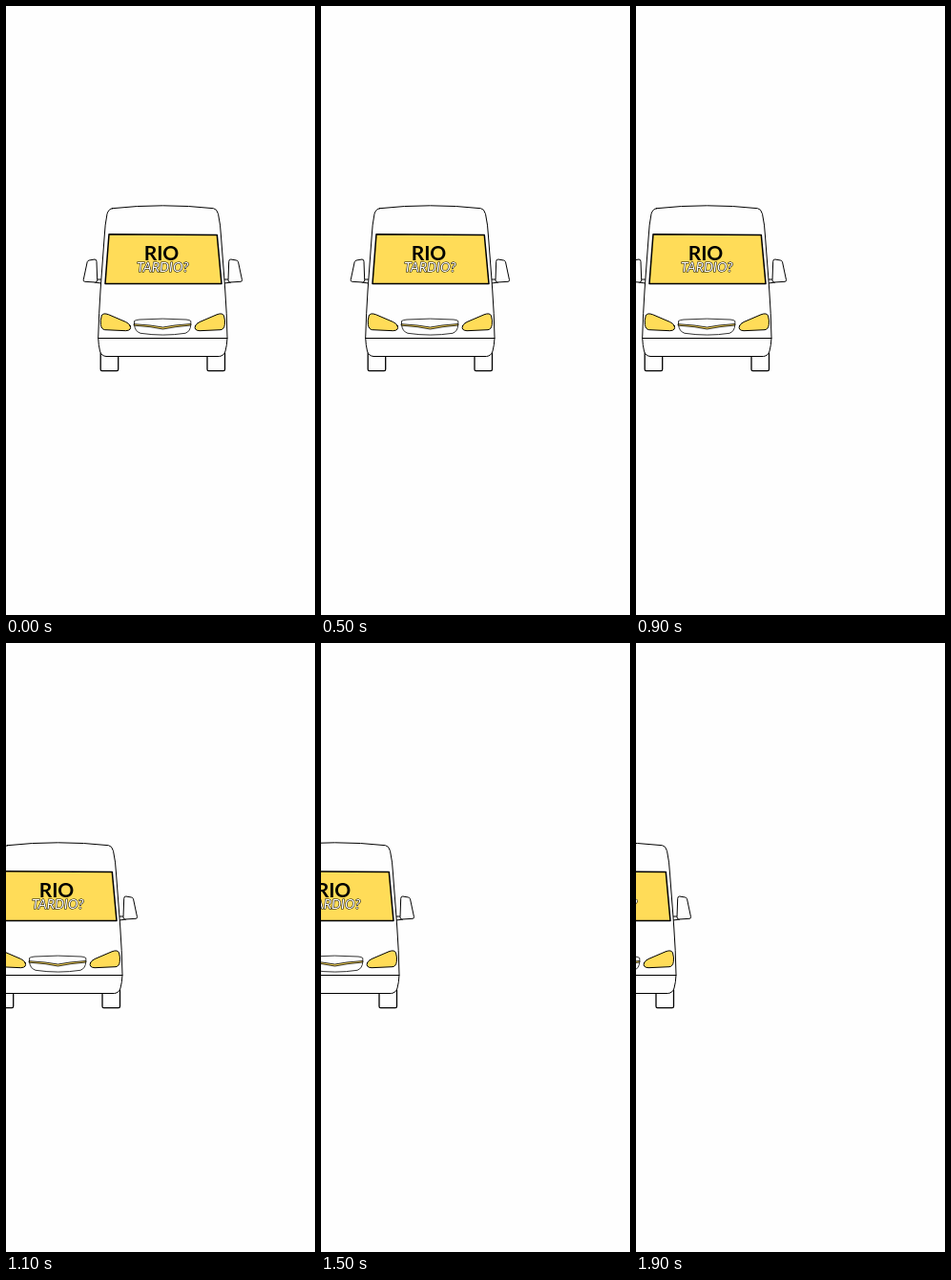
Recreate the animation shown at these times as an HTML page. Size 324x637 px, loop 2000 ms.

```html
<!DOCTYPE html>
<html lang="pt">
<head>
<meta charset="utf-8">
<title>Van</title>
<style>
  html, body { margin: 0; width: 100%; height: 100%; overflow: hidden; background: #fefefe; }
  svg { display: block; width: 100%; height: 100%; }
  .line { fill: #fefefe; stroke: #000; stroke-width: 1; stroke-linejoin: round; stroke-linecap: round; }
  .bold { stroke-width: 1.3; }
  .thin { stroke-width: .8; }
  .sun { fill: #ffdc58; }
  .glass { stroke-width: 1.5; }
  text { font-family: Lato, "Open Sans", sans-serif; text-anchor: middle; }
  .big { font-size: 21px; font-weight: 700; }
  .small { font-size: 14.2px; font-style: italic; fill: #fff; stroke: #000; stroke-width: 1; paint-order: stroke; }
</style>
</head>
<body>
<svg viewBox="0 0 324 637">
  <defs>
    <g id="side" class="line">
      <path class="bold" d="M211 366V380Q211 381.700 212.500 381.700H228Q229.500 381.700 229.500 380V363"/>
      <path d="M229 286H236V289L229 290"/>
      <path d="M233.700 267Q233.700 265 235.700 265L241.500 266Q243 266.300 243.500 267.700L247.500 286.500Q247.800 288.200 246 288.300L235 289Q233 289 233 287Z"/>
    </g>
    <path id="lamp" class="line sun" d="M198.500 334.500Q199.300 332.300 203 330.500L221 322.800Q227 320.500 228.500 324Q230 329 229.300 333.500Q228.500 338.300 225 338.700L203 339.700Q196.500 339.300 198.500 334.500Z"/>
  </defs>
  <g id="van">
    <use href="#side"/>
    <use href="#side" transform="matrix(-1 0 0 1 328.700 0)"/>
    <path class="line" d="M111.500 211.700Q137 208.800 164.500 208.800T217.500 211.700Q221 212 222.500 217.500Q225 229 225.500 241L228.800 284L229.800 298Q231.500 320 232 347Q231.700 355 230 361Q228.500 366 223.500 366.500H105Q100 366 98.500 361Q97 355 96.700 347Q97.500 320 99 298L100 284L103.200 241Q103.700 229 106 217.500Q107.500 212.200 111.500 211.700Z"/>
    <path class="line" d="M96.700 347.500H232"/>
    <path class="line sun glass" d="M108 238.700L221.300 239.500L226 290.500H104Z"/>
    <use href="#lamp"/>
    <use href="#lamp" transform="matrix(-1 0 0 1 328.700 0)"/>
    <g class="line thin">
      <path d="M134.500 333V329.500Q136 328.300 140 328Q164 326.200 189 328Q192.500 328.300 193.800 329.500V333Q193.500 340.500 188 342.300Q165 345.800 141 342.300Q135 340.500 134.500 333Z"/>
      <path class="sun" d="M134.500 332.700L151 334L164.500 336L177 334L193.800 332.500V334L178 335.700L164.500 338L151 335.700L134.500 334.200Z"/>
    </g>
    <text class="big" x="163" y="266.300">RIO</text>
    <text class="small" x="164.200" y="277.700">TARDIO?</text>
  </g>
</svg>
<script>
  const van = document.getElementById('van');
  const LOOP = 2000, STEP = 100, SHIFT = 10;

  function draw(ms) {
    const step = Math.floor((ms % LOOP) / STEP);
    van.setAttribute('transform', `translate(${-step * SHIFT} 0)`);
  }

  let start;
  function tick(now) {
    start ??= now;
    draw(Math.max(0, now - start));
    requestAnimationFrame(tick);
  }
  draw(0);
  requestAnimationFrame(tick);
</script>
</body>
</html>
```
